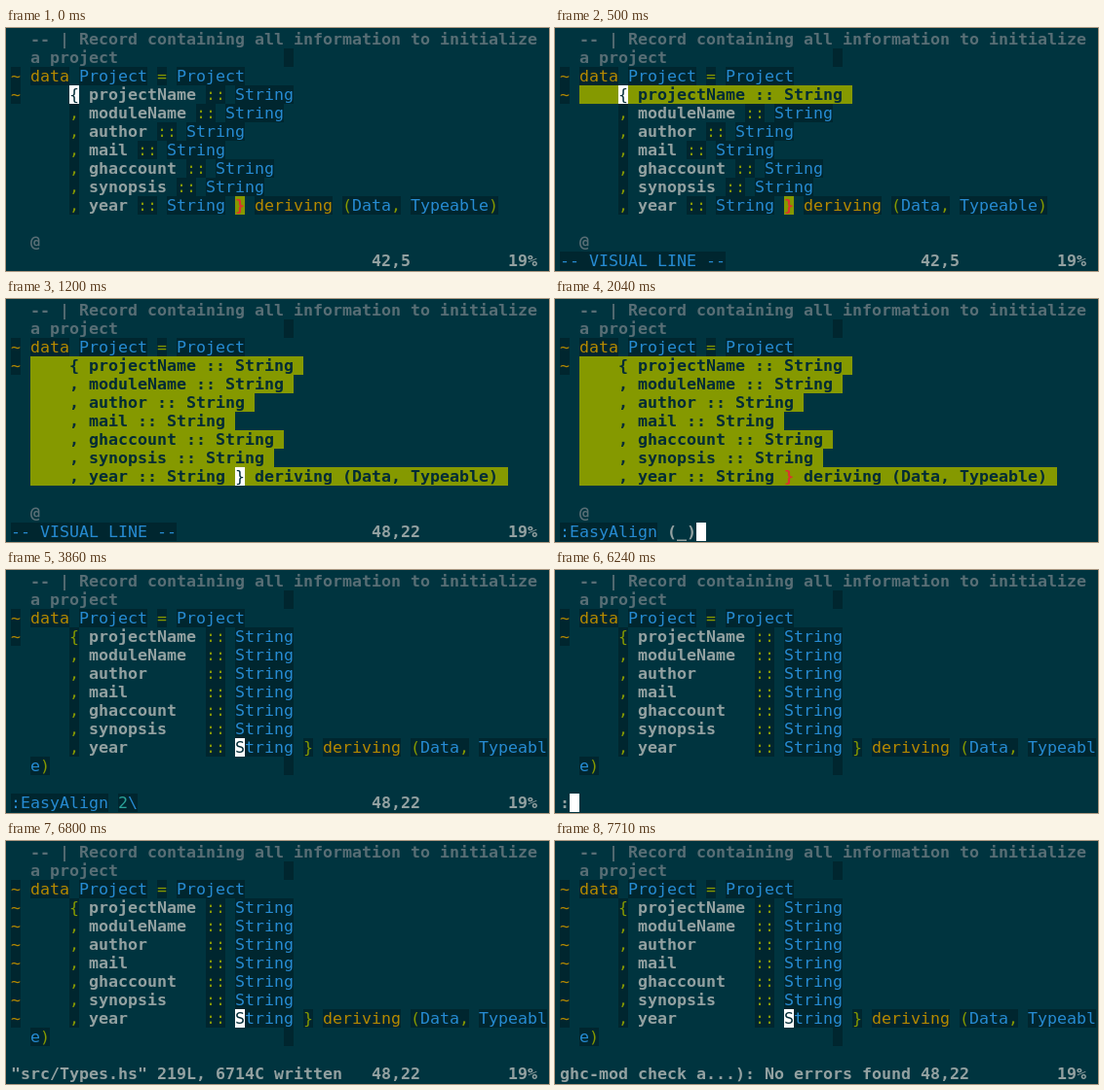
An HTML page that plays this animation: 557 by 250 pixels, repeating every 8 s.

```html
<!DOCTYPE html>
<html lang="en">
<head>
<meta charset="utf-8">
<title>Aligning a record in the editor</title>
<style>
  html, body { margin: 0; width: 100%; height: 100%; overflow: hidden; background: #00343f; }
  .screen { position: absolute; left: 0; top: 0; width: 557px; height: 250px; overflow: hidden; visibility: hidden; }
  .screen.on { visibility: visible; }
  span {
    position: absolute; height: 19px; white-space: pre;
    font: 16.61px/19px "DejaVu Sans Mono", monospace;
  }
  .plain, .comment, .sel, .match { font-weight: bold; }
  .plain { color: #93a1a1; }
  .comment { color: #586e75; }
  .key, .type, .op, .num, .bar { background: #00262f; }
  .key { color: #b58900; }
  .type { color: #268bd2; }
  .op { color: #859900; }
  .num { color: #2aa198; }
  .sel { color: #002b36; background: #859900; }
  .match { color: #dc322f; background: #859900; }
  .cursor { color: #002b36; background: #fff; }
</style>
</head>
<body>
<script>
const LOOP = 8000, CELL = 10, LINE = 19, LEFT = 5, TOP = 2;
const CODE = 2, FIRST = 3, LAST = 9, STATUS = 12;

const fields = ['projectName', 'moduleName', 'author', 'mail', 'ghaccount', 'synopsis', 'year'];
const tail = ' } deriving (Data, Typeable)';

const record = width => fields.map((name, i) =>
  `    ${i ? ',' : '{'} ${name.padEnd(width)} :: String${name === 'year' ? tail : ''}`);
const loose = record(0), aligned = record(11);

function put(el, row, col, text, kind) {
  const s = document.createElement('span');
  s.className = kind;
  s.textContent = text;
  s.style.left = LEFT + col * CELL + 'px';
  s.style.top = TOP + row * LINE + 'px';
  s.style.width = text.length * CELL + 'px';
  el.append(s);
}

function code(el, row, text) {
  for (const m of text.matchAll(/::|\w+|[{}(),=]/g)) {
    const w = m[0];
    const kind = /^(data|deriving)$/.test(w) ? 'key'
      : /^[A-Z]/.test(w) ? 'type'
      : /^\w/.test(w) ? 'plain' : 'op';
    put(el, row, CODE + m.index, w, kind);
  }
}

function screen({ lines = aligned, selected = 0, signs = 2, match, cursor, status = [], ruler }) {
  const el = document.createElement('div');
  el.className = 'screen';

  put(el, 0, CODE, '-- | Record containing all information to initialize', 'comment');
  put(el, 1, CODE, 'a project', 'comment');
  put(el, 1, 28, ' ', 'bar');
  code(el, 2, 'data Project = Project');
  for (let i = 0; i < signs; i++) put(el, 2 + i, 0, '~', 'key');

  lines.forEach((text, i) => {
    if (i < selected) put(el, FIRST + i, CODE, text + ' ', 'sel');
    else code(el, FIRST + i, text.slice(0, 53));
  });
  if (lines === aligned) {
    put(el, LAST + 1, CODE, 'e', 'type');
    put(el, LAST + 1, CODE + 1, ')', 'op');
    put(el, LAST + 1, 28, ' ', 'bar');
  } else {
    put(el, 11, CODE, '@', 'comment');
  }

  let col = 0;
  for (const [text, kind = 'plain'] of status) {
    put(el, STATUS, col, text, kind);
    col += text.length;
  }
  if (ruler) {
    put(el, STATUS, 37, ruler, 'plain');
    put(el, STATUS, 51, '19%', 'plain');
  }
  if (match) put(el, ...match, '}', 'match');
  put(el, ...(cursor || [STATUS, col, ' ']), 'cursor');
  document.body.append(el);
  return el;
}

const brace = [LAST, 23];
const open = [FIRST, 6, '{'], close = [...brace, '}'], letter = [LAST, 23, 'S'];
const visual = [['-- VISUAL LINE --', 'type']];
const align = [':EasyAlign', 'type'];
const written = [['"src/Types.hs" 219L, 6714C written']];

const steps = [
  [0, { lines: loose, match: brace, cursor: open, ruler: '42,5' }],
  [500, { lines: loose, selected: 1, match: brace, cursor: open, status: visual, ruler: '42,5' }],
  [1200, { lines: loose, selected: 7, cursor: close, status: visual, ruler: '48,22' }],
  [2040, { lines: loose, selected: 7, match: brace, status: [align, [' (_)']] }],
  [3020, { lines: loose, selected: 7, match: brace, status: [align, [' ('], ['2', 'num'], ['_)']] }],
  [3860, { cursor: letter, status: [align, [' '], ['2', 'num'], ['\\', 'type']], ruler: '48,22' }],
  [6240, { status: [[':']] }],
  [6310, { status: [[':w']] }],
  [6730, { cursor: letter, status: written, ruler: '48,22' }],
  [6800, { signs: 8, cursor: letter, status: written, ruler: '48,22' }],
  [7710, { signs: 8, cursor: letter, status: [['ghc-mod check a...): No errors found']], ruler: '48,22' }],
].map(([at, view]) => ({ at, el: screen(view) }));

let shown;
const start = performance.now();
function draw() {
  const t = (performance.now() - start) % LOOP;
  const now = steps.findLast(s => s.at <= t) || steps[0];
  if (now !== shown) {
    if (shown) shown.el.classList.remove('on');
    now.el.classList.add('on');
    shown = now;
  }
  requestAnimationFrame(draw);
}
draw();
</script>
</body>
</html>
```
